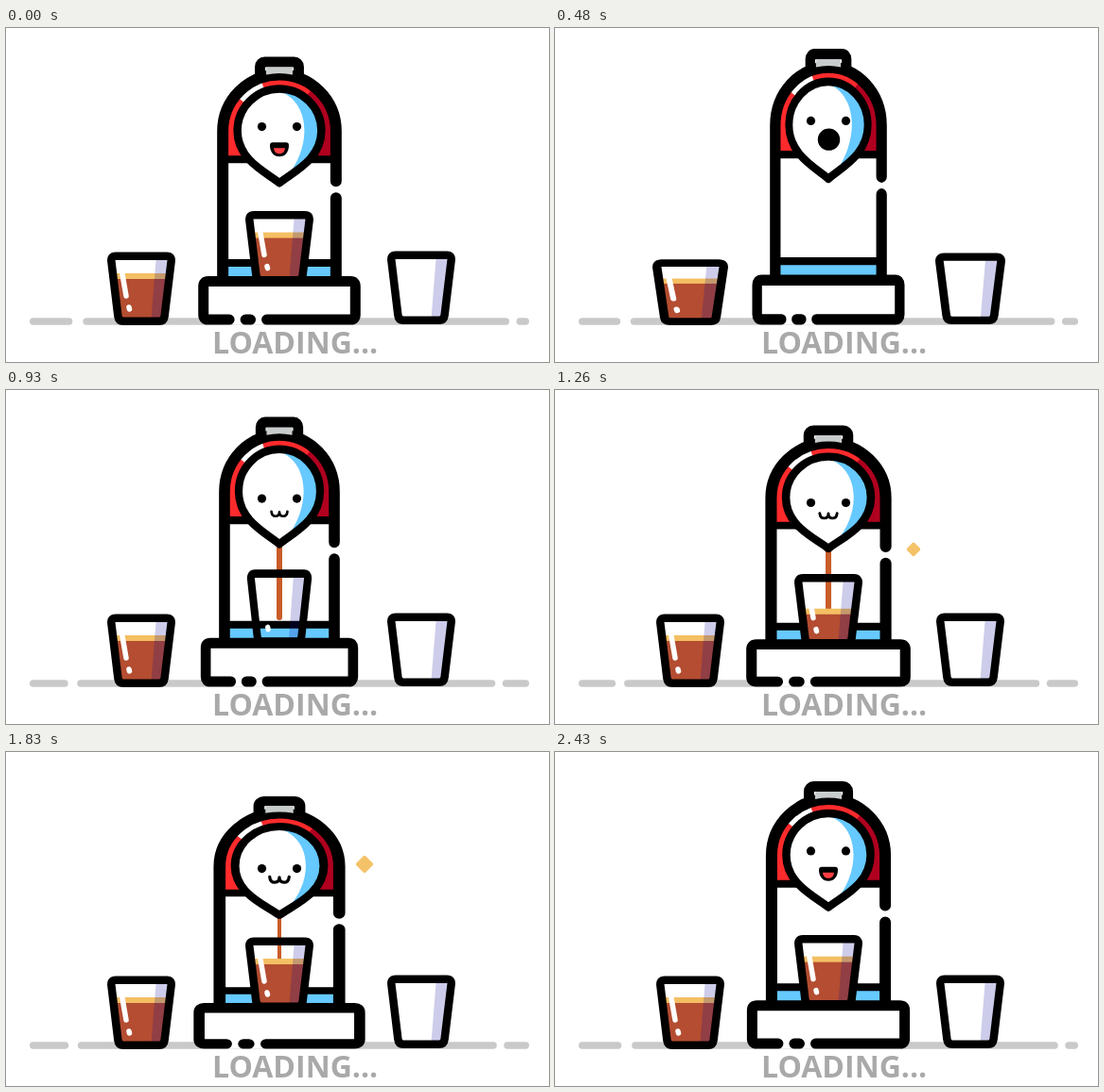
These frames come from a looping animation (574 px wide and 354 px high, 2.46 s). An HTML page:

```html
<!DOCTYPE html>
<html lang="en">
<head>
<meta charset="utf-8">
<title>Coffee loader</title>
<style>
  html, body { margin: 0; width: 100%; height: 100%; overflow: hidden; background: #fff; }
  svg { display: block; width: 574px; height: 354px; }
  .line { fill: none; stroke: #000; stroke-linecap: round; stroke-linejoin: round; }
  #ground line { stroke: #c9c9c9; stroke-width: 7.5; stroke-linecap: round; }
  .shine { stroke: #fff; stroke-width: 5.5; stroke-linecap: round; }
  text { font: 700 32px "Open Sans", sans-serif; fill: #a9a9a9; }
</style>
</head>
<body>
<svg viewBox="0 0 574 354">
  <defs>
    <path id="glass" d="M-27-73.3H27Q32.5-73.3 31.6-67.5L24.6-9.5Q24-4.3 19-4.3H-19Q-24-4.3-24.6-9.5L-31.6-67.5Q-32.5-73.3-27-73.3Z"/>
    <clipPath id="inside"><use href="#glass"/></clipPath>
    <path id="drop" d="M289 164C276 153 244.5 140 244.5 108.5A44.5 44.5 0 0 1 333.5 108.5C333.5 140 302 153 289 164Z"/>
    <clipPath id="head"><use href="#drop"/></clipPath>
    <clipPath id="dome"><path d="M229 139V109A60 60 0 0 1 349 109V139Z"/></clipPath>
  </defs>

  <g id="ground"><line/><line/><line/></g>
  <text x="218" y="344.5">LOADING...</text>

  <g class="machine">
    <rect x="268.5" y="35.5" width="41" height="30" rx="5" class="line" stroke-width="11"/>
    <path d="M229 265V109A60 60 0 0 1 349 109V265Z" fill="#fff"/>
    <g clip-path="url(#dome)">
      <rect x="229" y="49" width="120" height="90" fill="#ff2a2c"/>
      <path d="M289 109L235 65L267 48Z" fill="#fff"/>
      <path d="M289 109L337 47H355V139H289Z" fill="#b0001f"/>
    </g>
    <rect x="229" y="249" width="120" height="18" fill="#66c9ff"/>
    <path class="line" stroke-width="8" d="M229 139H349M229 249H349"/>
    <path class="line" stroke-width="12" d="M229 268V109A60 60 0 0 1 349 109V162M349 180V268"/>
    <path d="M275 41H303V49Q289 46 275 49Z" fill="#c9cccc"/>
  </g>

  <line id="stream" x1="289" x2="289" stroke="#c95c28" stroke-linecap="round"/>
  <circle id="drip" cx="289" r="3.5" fill="#c95c28"/>

  <g class="machine">
    <use href="#drop" fill="#fff"/>
    <path clip-path="url(#head)" fill="#66c9ff" d="M288 66C323 78 323 126 297 157L340 160V60Z"/>
    <use href="#drop" class="line" stroke-width="8.5"/>
  </g>

  <g id="eyes"><circle cx="270.5" r="4.6"/><circle cx="307.5" r="4.6"/></g>
  <g id="smile">
    <path d="M-7-7.5H7Q10-7.5 10-4.5C10 3 6 7.5 0 7.5S-10 3-10-4.5Q-10-7.5-7-7.5Z"/>
    <path d="M-6-1.5H6C5.5 3 3 4.5 0 4.5S-5.5 3-6-1.5Z" fill="#ff3e42"/>
  </g>
  <circle id="gasp" r="11.7"/>
  <path id="purr" class="line" stroke-width="3" d="M-9.5-2.5Q-9 3-4.5 3Q0 3 0-2Q0 3 4.5 3Q9 3 9.5-2.5"/>

  <g id="cups"></g>

  <g class="machine">
    <rect x="208.5" y="268.5" width="161" height="46" rx="5" fill="#fff"/>
    <path class="line" stroke-width="11" d="M236 309H213.5Q208.5 309 208.5 304V273.5Q208.5 268.5 213.5 268.5H364.5Q369.5 268.5 369.5 273.5V304Q369.5 309 364.5 309H275.5M253 309H258.5"/>
  </g>

  <rect id="spark" x="-7" y="-7" width="14" height="14" rx="2" fill="#f4c268"/>
</svg>
<script>
const LOOP = 2460, FLOOR = 314, MID = 289, LEFT = 143, RIGHT = 439;
const $ = id => document.getElementById(id);
const set = (el, attrs) => { for (const name in attrs) el.setAttribute(name, attrs[name]); };
const clamp = p => Math.min(1, Math.max(0, p));
const span = (t, from, to) => clamp((t - from) / (to - from));
const ease = p => (1 - Math.cos(Math.PI * p)) / 2;
const mix = (a, b, p) => a + (b - a) * p;
const arc = (p, height) => 4 * height * p * (1 - p);

// Eased value along time, value pairs
function key(t, ...k) {
  let i = 0;
  while (i < k.length - 4 && t > k[i + 2]) i += 2;
  return mix(k[i + 1], k[i + 3], ease(span(t, k[i], k[i + 2])));
}

const cups = Array.from({ length: 4 }, () => {
  const g = document.createElementNS("http://www.w3.org/2000/svg", "g");
  g.innerHTML = `<g clip-path="url(#inside)">
      <g class="coffee"><rect x="-35" y="-55" width="70" height="7" fill="#f4bf63"/>
      <rect x="-35" y="-49" width="70" height="60" fill="#b44d31"/></g>
      <path d="M16-75H40V0H10Z" fill="rgb(5,0,150)" fill-opacity=".2"/>
      <path class="shine" d="M-20-54L-16-31M-13-19L-12.5-17"/>
    </g><use href="#glass" class="line" stroke-width="8.5"/>`;
  $("cups").append(g);
  return g;
});

function place(el, x, y, sx = 1, sy = sx) {
  set(el, { transform: `translate(${x} ${y}) scale(${sx} ${sy})` });
}

function placeCup(i, x, y, squash, size, fill) {
  place(cups[i], x, y, size * (1 + squash), size * (1 - .9 * squash));
  set(cups[i].querySelector(".coffee"), { transform: `translate(0 ${55 * (1 - fill)})` });
}

function draw(t) {
  // Machine squash and stretch, anchored on the floor
  const ky = key(t, -180, 281.5, 450, 292, 1850, 267, 2100, 290, 2280, 281.5, 2910, 292) / 284;
  const kx = key(t, -180, 174, 450, 161, 1850, 181.3, 2100, 167, 2280, 174, 2910, 161) / 172;
  for (const el of document.querySelectorAll(".machine"))
    set(el, { transform: `translate(${MID} ${FLOOR}) scale(${kx} ${ky}) translate(${-MID} ${-FLOOR})` });
  const onBase = y => FLOOR - (FLOOR - y) * ky;

  // Gaps sliding along the ground
  const c = (1 + Math.cos(2 * Math.PI * (t - 120) / LOOP)) / 2;
  const ends = [25, 64 + 6.5 * c, 73 + 8.5 * c, 512 + 20.5 * c, 519.5 + 20.5 * c, 553];
  [...$("ground").children].forEach((el, i) => set(el, {
    x1: ends[2 * i] + 3.75, x2: ends[2 * i + 1] - 3.75, y1: 311, y2: 311
  }));

  // Face
  place($("eyes"), 0, key(t, -180, 106, 450, 98.3, 580, 99, 840, 114.5, 1260, 119.5, 1850, 123.6, 2100, 100, 2280, 106, 2910, 98.3));
  const smile = t < 1000 ? key(t, 150, 1, 270, 0) : key(t, 1940, 0, 2040, 1);
  place($("smile"), MID, onBase(128.5), smile);
  place($("gasp"), MID + .5, onBase(123.5), key(t, 240, 0, 420, 1, 600, 1, 720, 0));
  place($("purr"), MID, key(t, 700, 130, 1260, 133, 1850, 135), key(t, 690, 0, 780, .88, 1830, 1.08, 1950, 0));

  // Coffee
  const tip = onBase(166);
  set($("stream"), {
    y1: tip, y2: Math.max(tip, mix(166, 305, span(t, 830, 1010))) - 3,
    "stroke-width": t < 830 ? 0 : key(t, 1260, 6, 1830, 4, 1950, 0)
  });
  const fall = span(t, 1950, 2140);
  set($("drip"), { cy: 172 + 58 * fall * fall, visibility: fall > 0 && fall < 1 ? "visible" : "hidden" });

  // Cups: leaving, moving to the left, moving under the spout, arriving
  const seat = onBase(271.5);
  const leave = span(t, 60, 330);
  placeCup(0, LEFT - 95 * leave, 315 - arc(leave, 25), 0, 1 - leave, 1);

  const hop = span(t, 120, 390);
  placeCup(1, mix(MID, LEFT, hop), mix(seat, 315, hop) - arc(hop, 60),
    key(t, 0, 0, 120, .15, 210, -.1, 360, -.08, 450, .13, 600, -.05, 750, 0), 1, 1);

  const jump = span(t, 570, 780);
  placeCup(2, mix(RIGHT, MID, jump), mix(314, seat, jump) - arc(jump, 70),
    key(t, 450, 0, 570, .18, 660, -.1, 780, -.08, 850, .12, 940, -.055, 1050, 0), 1,
    ease(span(t, 930, 1430)));

  const arrive = span(t, 600, 840);
  placeCup(3, RIGHT + 95 * (1 - arrive), 314 - arc(arrive, 25), 0, arrive, 0);

  // Spark
  const glow = key(t, 1110, 0, 1260, .8, 1830, 1, 2010, 0);
  set($("spark"), { transform: `translate(379 ${169 - (t - 1260) * .0877}) rotate(45) scale(${glow})` });
}

function frame() {
  draw(performance.now() % LOOP);
  requestAnimationFrame(frame);
}
frame();
</script>
</body>
</html>
```
